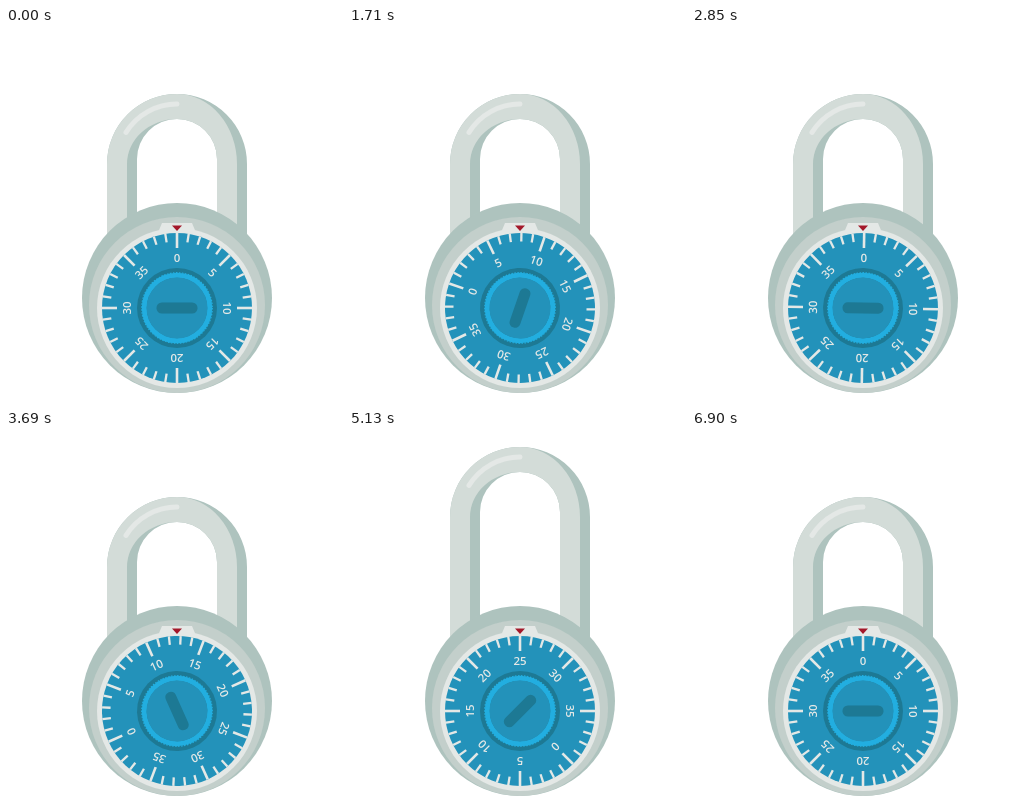
An HTML page for the animation above (7.2 s loop, 337x375 px).

```html
<!DOCTYPE html>
<html lang="en">
<head>
<meta charset="utf-8">
<title>Combination lock</title>
<style>
  html, body { margin: 0; width: 100%; height: 100%; overflow: hidden; background: #fff; }
  svg { display: block; width: 337px; height: 375px; }
  text { font: 600 11.5px "Open Sans", "Noto Sans", sans-serif; font-stretch: 75%; fill: #e4e8e6; text-anchor: middle; }
</style>
</head>
<body>
<svg viewBox="0 0 337 375">
  <g id="shackle">
    <path fill="#aec3be" d="M101 290V136A70 70 0 0 1 241 136V290H211V131A40 40 0 0 0 131 131V290Z"/>
    <path fill="#d3dcd8" d="M101 290V136A70 70 0 0 1 171 66A60 70 0 0 1 231 136V290H211V131A40 40 0 0 0 171 91A50 45 0 0 0 121 136V290Z"/>
    <path fill="none" stroke="#e4e8e6" stroke-width="5" stroke-linecap="round" d="M120 104.4A60 60 0 0 1 171 76"/>
  </g>
  <circle cx="171" cy="270" r="95" fill="#aec3be"/>
  <circle cx="171" cy="277" r="88" fill="#c3cfcb"/>
  <circle cx="171" cy="280" r="80" fill="#e4e8e6"/>
  <path fill="#e4e8e6" d="M156 195H186L191 207H151Z"/>
  <path fill="#a3182a" d="M166 197.5H176L171 203Z"/>
  <g id="dial">
    <circle r="75" fill="#2392ba"/>
    <g id="marks" stroke="#e4e8e6"></g>
    <circle r="40" fill="#1d7994"/>
    <g fill="none" stroke="#22aee0">
      <circle r="32.7" stroke-width="5"/>
      <circle r="35.3" stroke-width="1.2" stroke-dasharray="1.5 1.5"/>
    </g>
    <circle r="30.5" fill="#2392ba"/>
    <rect x="-20.5" y="-5.5" width="41" height="11" rx="5.2" fill="#1d7994"/>
  </g>
</svg>
<script>
const get = id => document.getElementById(id);

let marks = "";
for (let n = 0; n < 40; n++) {
  const major = n % 5 === 0;
  marks += `<g transform="rotate(${n * 9})">
    <path d="M0 -75V${major ? -60 : -66.5}" stroke-width="${major ? 2.6 : 2.3}"/>
    ${major ? `<text y="-46" stroke="none">${n}</text>` : ""}</g>`;
}
get("marks").innerHTML = marks;

// Moves: start ms, end ms, start value, end value
const turns = [
  [30, 1800, 0, 654],
  [1920, 3240, 654, -173],
  [3360, 4540, -173, 135],
  [6015, 6900, 135, 0]
];
const lifts = [[4530, 5130, 0, -50], [5400, 6000, -50, 0]];

function valueAt(moves, t) {
  let value = 0;
  for (const [start, end, from, to] of moves) {
    if (t < start) break;
    const u = Math.min(1, (t - start) / (end - start));
    value = from + (to - from) * u * u * (3 - 2 * u);
  }
  return value;
}

const LOOP = 7200, STEP = 30;
const begin = performance.now();

function draw(now) {
  const elapsed = Math.max(0, now - begin) % LOOP;
  const t = Math.floor(elapsed / STEP) * STEP;
  get("dial").setAttribute("transform", `translate(171 280) rotate(${valueAt(turns, t)})`);
  get("shackle").setAttribute("transform", `translate(0 ${valueAt(lifts, t)})`);
  requestAnimationFrame(draw);
}
draw(begin);
</script>
</body>
</html>
```
